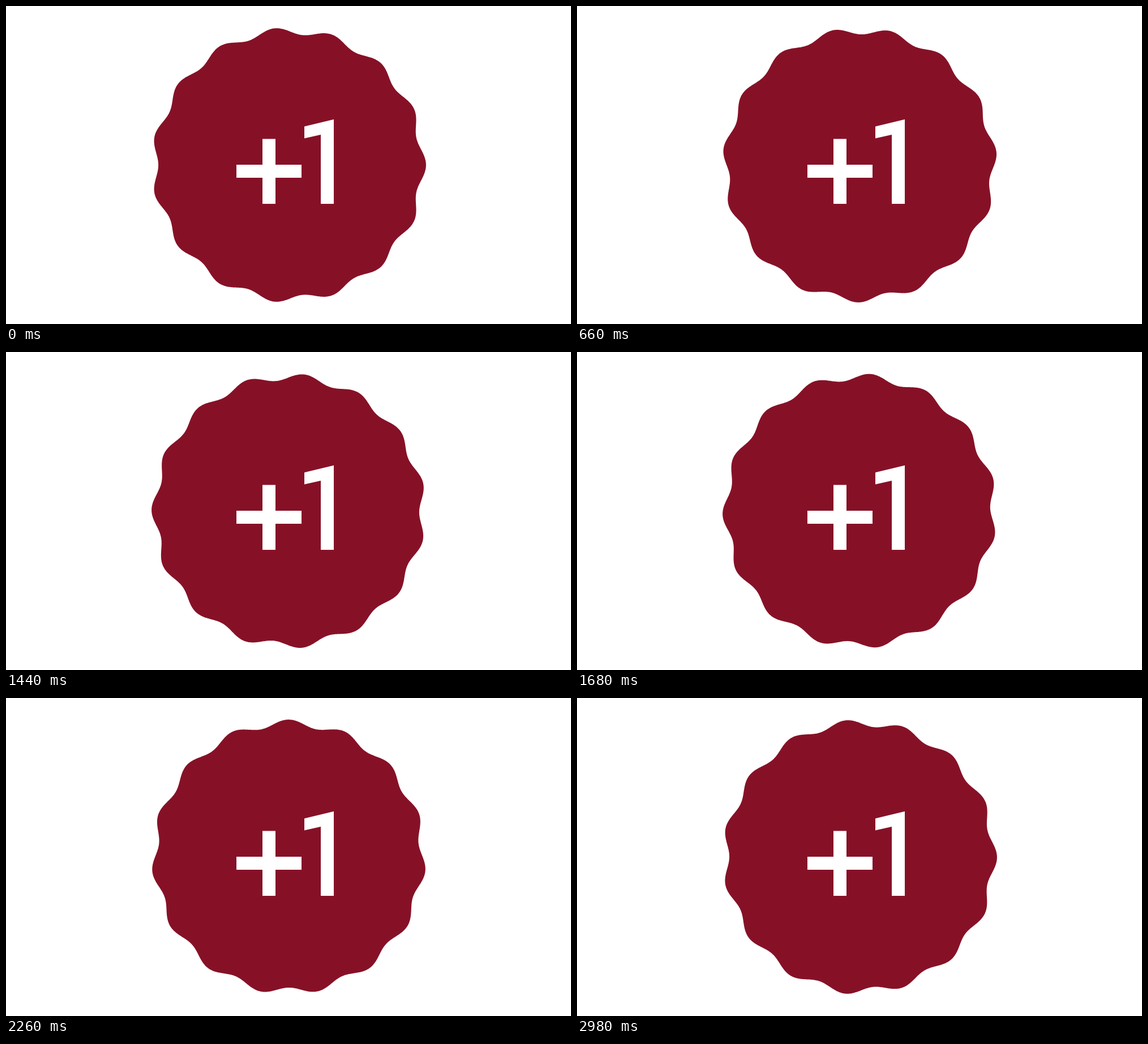
An HTML page with a canvas for the animation above (3000 ms loop, 998 px wide and 561 px high).

```html
<!DOCTYPE html>
<html lang="en">
<head>
<meta charset="utf-8">
<title>+1</title>
<style>
  html, body { margin: 0; width: 100%; height: 100%; overflow: hidden; background: #fff; }
  canvas { display: block; }
</style>
</head>
<body>
<canvas id="stage" width="998" height="561" role="img" aria-label="+1"></canvas>
<script>
const ctx = document.getElementById('stage').getContext('2d');
const LOOP = 3000;
const LOBES = 15;
const CX = 499.5, CY = 280.5;
const RADIUS = 236.4, WAVE = 6;
const TAU = Math.PI * 2;

// Wavy disc; one loop turns it by exactly one lobe, counterclockwise.
function badge(turn) {
  const steps = 1080;
  ctx.beginPath();
  for (let i = 0; i < steps; i++) {
    const a = i / steps * TAU;
    const r = RADIUS + WAVE * Math.cos(LOBES * (a + turn));
    ctx.lineTo(CX + r * Math.cos(a), CY + r * Math.sin(a));
  }
  ctx.closePath();
  ctx.fillStyle = '#861127';
  ctx.fill();
}

function label() {
  ctx.fillStyle = '#fff';
  ctx.fillRect(407, 280, 115, 23);
  ctx.fillRect(453, 234.5, 23, 114.5);
  ctx.beginPath();
  ctx.moveTo(579, 200);
  ctx.lineTo(527, 212.5);
  ctx.lineTo(527, 233.5);
  ctx.lineTo(556, 227);
  ctx.lineTo(556, 349);
  ctx.lineTo(579, 349);
  ctx.fill();
}

function draw(now) {
  ctx.fillStyle = '#fff';
  ctx.fillRect(0, 0, 998, 561);
  badge(now % LOOP / LOOP * TAU / LOBES);
  label();
}

function tick() {
  draw(performance.now());
  requestAnimationFrame(tick);
}
tick();
</script>
</body>
</html>
```
